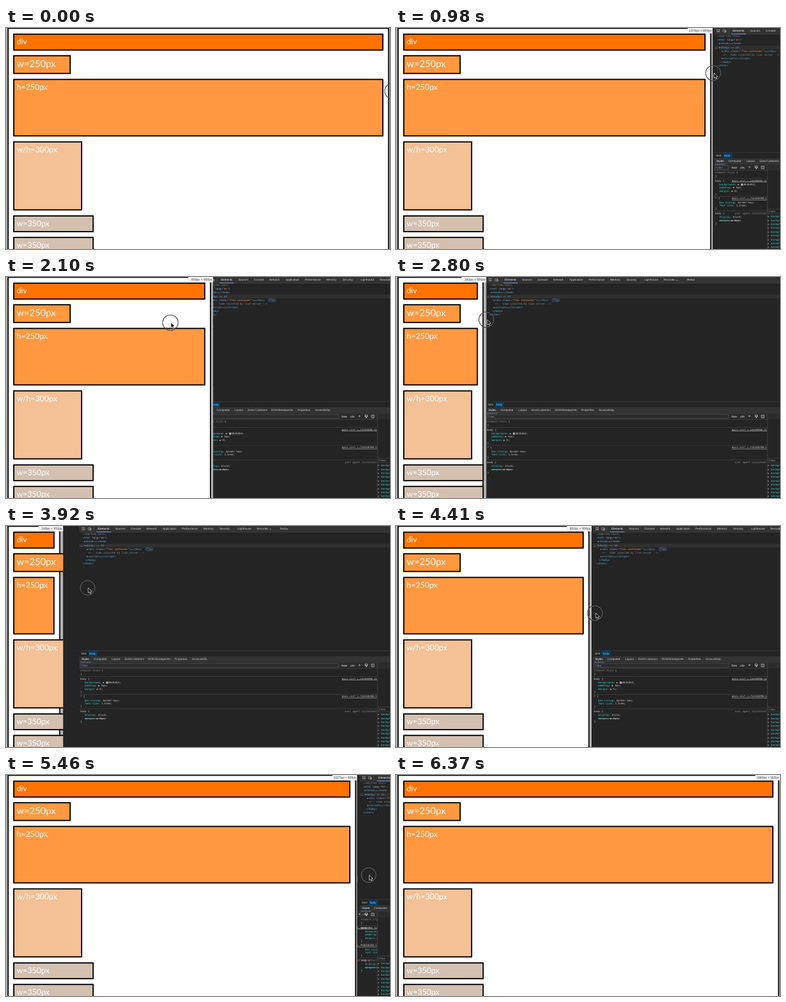
Recreate the animation shown at these times as an HTML page with a canvas. Size 640x368 px, loop 6.44 s.

```html
<!DOCTYPE html>
<html lang="en">
<head>
<meta charset="utf-8">
<title>Resizing boxes</title>
<style>
html, body { margin: 0; overflow: hidden; background: #fff; }
canvas { display: block; }
</style>
</head>
<body>
<canvas id="stage" width="640" height="368"></canvas>
<script>
const c = document.getElementById('stage').getContext('2d');
const LOOP = 6440, STEP = 70, SCALE = 0.3835;
const SANS = '4.65px "Liberation Sans", Arial, sans-serif';
const MONO = '4.22px "DejaVu Sans Mono", monospace';
const CHAR = 4.22 * 0.602;
const TAG = '#5db0d7', GREY = '#8c8c8c', PALE = '#d0d0d0', PROP = '#35d4c7';

// time, viewport width in CSS px, tools left edge, pointer x, pointer y
const keys = [
  [0, 1669, 643, 644, 105],
  [980, 1376, 530, 529, 75],
  [1820, 1030, 394, 392, 75],
  [1960, 1030, 394, 392, 75],
  [2100, 900, 327, 274, 76],
  [2450, 450, 168, 160, 73],
  [2800, 393, 150, 151, 71],
  [3220, 280, 108, 108, 82],
  [3360, 280, 108, 108, 82],
  [3710, 125, 55, 62, 97],
  [3920, 249, 122, 136, 103],
  [4410, 850, 328, 332, 145],
  [4550, 850, 328, 332, 145],
  [4970, 1194, 460, 463, 182],
  [5670, 1669, 645, 665, 160],
  [LOOP, 1669, 645, 665, 160]
];

const boxes = [
  [9.3, 0, 28.4, '#ff7300', 'div', 13.2, 27],
  [45.2, 250, 31.5, '#ff9840', 'w=250px', 15.7, 65.3],
  [84.6, 0, 96, '#ff9840', 'h=250px', 13.2, 102.5],
  [188.6, 300, 115.2, '#f4c096', 'w/h=300px', 13.2, 206.5],
  [311.9, 350, 28.2, '#d3c0b1', 'w=350px', 13.2, 329.7],
  [347.7, 350, 28.2, '#d3c0b1', 'w=350px', 13.2, 365.5]
];

const topTabs = { Elements: 31, Sources: 60, Console: 86, Network: 112, Application: 139, Performance: 171,
  Memory: 207, Security: 234, Lighthouse: 264, Recorder: 296, Redux: 335 };
const styleTabs = { Styles: 4, Computed: 24, Layout: 54, 'Event Listeners': 76, 'DOM Breakpoints': 115,
  Properties: 159, Accessibility: 188 };

function pose(t) {
  const i = keys.findIndex(k => k[0] > t), a = keys[i - 1], b = keys[i];
  const f = (t - a[0]) / (b[0] - a[0]);
  return a.map((v, n) => v + (b[n] - v) * f);
}

function rect(x, y, w, h, color) {
  c.fillStyle = color;
  c.fillRect(x, y, w, h);
}

function frame(x, y, w, h, color, line = 0.5) {
  c.strokeStyle = color;
  c.lineWidth = line;
  c.strokeRect(x, y, w, h);
}

function text(str, x, y, color, font = SANS, align = 'left', base = 'middle') {
  c.font = font;
  c.fillStyle = color;
  c.textAlign = align;
  c.textBaseline = base;
  c.fillText(str, x, y);
}

// Monospaced run made of alternating strings and colours
function code(x, y, parts, style = '') {
  for (let i = 0; i < parts.length; i += 2) {
    text(parts[i], x, y, parts[i + 1], style + MONO);
    x += parts[i].length * CHAR;
  }
}

function clip(x, w, draw) {
  c.save();
  c.beginPath();
  c.rect(x, 0, w, 368);
  c.clip();
  draw();
  c.restore();
}

function drawPage(view) {
  const right = view - (640 - view) * 0.0065;
  rect(0, 0, view, 368, '#b3b3b3');
  rect(2.5, 0, right - 4, 368, '#000');
  rect(4.5, 1.4, right - 7.9, 367, '#fff');
  for (const [y, size, h, color, label, font, base] of boxes) {
    const w = size ? size * SCALE : right - 23;
    rect(12, y, w, h, '#000');
    rect(14, y + 2, w - 4, h - 4, color);
    text(label, 17.7, base, '#fff', font + 'px Lato, sans-serif', 'left', 'alphabetic');
  }
}

function drawSize(view, px) {
  rect(view - 41.5, 0, 41.5, 9, '#f1f1f1');
  text(Math.round(px) + 'px × 959px', view - 1.5, 5, '#444', '5.3px "Liberation Sans", Arial, sans-serif', 'right');
}

function drawTree(x) {
  rect(x, 29.4, 640 - x, 6.1, '#303030');
  code(x + 6, 14, ['<!DOCTYPE html>', GREY]);
  code(x + 6, 20.1, ['<html ', TAG, 'lang', '#9bbbdc', '="', TAG, 'en', '#f29766', '">', TAG]);
  code(x + 8, 26.2, ['▶', GREY, '<head>', TAG, '…', PALE, '</head>', TAG]);
  code(x + 2, 32.4, ['…', PALE]);
  code(x + 8, 32.4, ['▼', GREY, '<body>', TAG, ' == ', GREY]);
  code(x + 36, 32.4, ['$0', GREY], 'italic ');
  code(x + 12.7, 38.5, ['▶', GREY, '<div ', TAG, 'class', '#9bbbdc', '="', TAG,
    'flex-container', '#f29766', '">', TAG, '…', PALE, '</div>', TAG]);
  c.beginPath();
  c.roundRect(x + 110, 36, 13, 5.2, 2.6);
  c.strokeStyle = '#3f7ea6';
  c.lineWidth = 0.6;
  c.stroke();
  text('flex', x + 116.5, 38.7, '#7cacf8', MONO, 'center');
  code(x + 15, 44.6, ['<!-- Code injected by live-server -->', GREY]);
  code(x + 12.7, 50.7, ['▶', GREY, '<script>', TAG, '…', PALE, '<\/script>', TAG]);
  code(x + 10.5, 56.9, ['</body>', TAG]);
  code(x + 6, 63, ['</html>', TAG]);
}

function drawRules(x) {
  const prop = (y, name, value, style) => code(x + 9, y, [name, PROP, ': ' + value + ';', PALE], style);
  const brace = y => code(x + 2, y, ['}', PALE]);
  const origin = (str, y) => {
    text(str, 618, y, PALE, MONO, 'right');
    rect(618 - str.length * CHAR, y + 2, str.length * CHAR, 0.5, PALE);
  };
  code(x + 2, 241, ['element.style ', GREY, '{', PALE]);
  brace(247);
  code(x + 2, 254.5, ['body {', PALE]);
  prop(260.8, 'background', '▶   #b3b3b3');
  rect(x + 45, 259.1, 3.4, 3.4, '#b3b3b3');
  prop(266.3, 'padding', '▶ 5px');
  prop(271.8, 'margin', '▶ 0');
  brace(277.2);
  code(x + 2, 284.3, ['* {', PALE]);
  prop(290.5, 'box-sizing', 'border-box');
  prop(296.1, 'font-size', '1.5rem');
  brace(301.3);
  code(x + 2, 309, ['body {', PALE], 'italic ');
  prop(315, 'display', 'block', 'italic ');
  prop(320.6, 'margin', '▶ 8px', 'italic ');
  rect(x + 9, 320.6, 36, 0.5, PALE);
  brace(326);
  origin('main.css?_c…14159298:11', 254.5);
  origin('main.css?_c…714159298:1', 284.3);
  text('user agent stylesheet', 618, 309, GREY, 'italic ' + MONO, 'right');
}

function drawTools(x) {
  const line = y => rect(x, y, 640 - x, 0.5, '#4a4a4a');
  rect(0, 0, 640, 368, '#242424');
  rect(x, 0, 640 - x, 10, '#333');
  line(10);
  frame(x + 5, 2.6, 4, 4, PALE);
  text('↖', x + 6, 5.8, PALE);
  frame(x + 15, 3, 4, 3.6, PALE);
  frame(x + 18, 4, 2, 3, PALE);
  rect(x + 24, 1.5, 0.5, 7, '#555');
  for (const name in topTabs) text(name, x + topTabs[name], 5, name == 'Elements' ? '#fff' : PALE);
  text('▲', x + 317, 5, GREY, MONO);
  rect(x + 29, 9.5, 24, 0.9, '#7cacf8');
  drawTree(x);

  line(207);
  rect(x + 15, 207.4, 15, 9.6, '#073d62');
  text('html', x + 3.5, 212.4, PALE);
  text('body', x + 17, 212.4, '#9fc8ea');
  rect(x, 217, 640 - x, 10, '#333');
  for (const name in styleTabs) text(name, x + styleTabs[name], 222.2, name == 'Styles' ? '#fff' : PALE);
  line(227);
  rect(x + 2, 226.6, 17, 0.9, '#7cacf8');

  rect(x, 227.5, 640 - x, 9.5, '#2b2b2b');
  frame(x + 2, 229, 552 - x, 6.7, '#666');
  text('Filter', x + 4, 232.5, GREY);
  text(':hov', 558.5, 232.4, PALE, 'bold ' + SANS);
  text('.cls', 573, 232.4, PALE, 'bold ' + SANS);
  text('+', 587, 232.2, '#eee', '7px "Liberation Sans", Arial, sans-serif');
  frame(598.5, 230, 4, 2.6, PALE, 0.8);
  rect(600, 232.6, 1.2, 2.4, PALE);
  frame(609, 230, 4.6, 4.6, PALE, 0.7);
  text('◂', 609.8, 232.3, PALE, MONO);
  for (const y of [237, 250, 280, 304.5]) rect(x, y, 619 - x, 0.5, '#4a4a4a');
  drawRules(x);

  rect(619, 237, 21, 131, '#242424');
  rect(618.8, 227, 0.6, 141, '#555');
  frame(620.5, 301.5, 25, 7.5, '#555');
  text('Filter', 622, 305.4, GREY);
  for (let i = 0; i < 9; i++) code(619.8, 314 + i * 6.4, ['▶', GREY, ' ', GREY, 'background', PROP]);
}

function drawPointer(x, y) {
  const ring = (r, color, width) => {
    c.beginPath();
    c.arc(x, y, r, 0, 7);
    c.strokeStyle = color;
    c.lineWidth = width;
    c.stroke();
  };
  ring(12.8, '#1c1c1c', 1.1);
  ring(12.3, 'rgba(255,255,255,.45)', 0.8);
  c.save();
  c.translate(x + 1, y);
  c.beginPath();
  [[0, 0], [0, 8.6], [2, 6.8], [3.4, 9.8], [4.8, 9.2], [3.5, 6.2], [6.2, 6]].forEach(p => c.lineTo(...p));
  c.closePath();
  c.fillStyle = '#000';
  c.fill();
  c.strokeStyle = '#fff';
  c.lineWidth = 0.7;
  c.stroke();
  c.restore();
}

function draw(now) {
  const t = Math.floor(now % LOOP / STEP) * STEP;
  const [, px, tools, mx, my] = pose(t);
  const view = px * SCALE;
  c.textRendering = 'geometricPrecision';
  clip(0, view, () => {
    drawPage(view);
    if (t > 0) drawSize(view, px);
  });
  if (view < 640) clip(view, 640 - view, () => drawTools(tools));
  drawPointer(mx, my);
  requestAnimationFrame(loop);
}

let start;
function loop(now) {
  start ??= now;
  draw(now - start);
}
requestAnimationFrame(loop);
</script>
</body>
</html>
```
